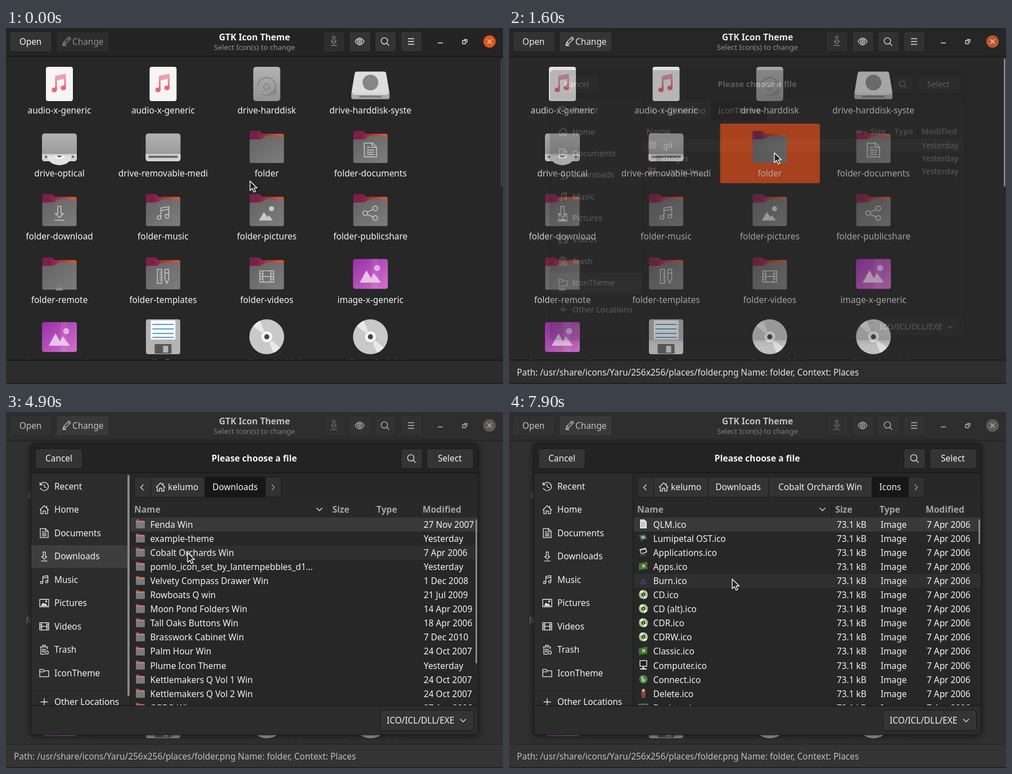
An HTML page for the animation above (8000 ms loop, 884x633 px).

```html
<!DOCTYPE html>
<html lang="en">
<head>
<meta charset="utf-8">
<title>GTK Icon Theme</title>
<style>
html,body{margin:0;width:100%;height:100%;overflow:hidden;background:#272727}
svg{display:block;width:100vw;height:100vh}
text{font:15.4px "Noto Sans","Open Sans",sans-serif;fill:#f4f4f4;white-space:pre}
.b{font-weight:700;font-size:15.7px}
.h{font-weight:700;font-size:15.6px;fill:#a4a4a4}
.s{font-size:13px;fill:#969696}
.m{text-anchor:middle}
.ln{fill:none;stroke:#e8e8e8;stroke-width:1.3;stroke-linejoin:round}
.em{fill:none;stroke:#c9c9c9;stroke-width:1.2;stroke-linejoin:round}
</style>
</head>
<body>
<svg id="stage" viewBox="0 0 884 633" preserveAspectRatio="none"></svg>
<script>
const LOOP = 8000, STEP = 100;

const rect = (x, y, w, h, fill, more = '') => `<rect x="${x}" y="${y}" width="${w}" height="${h}" fill="${fill}" ${more}/>`;
const path = (d, more = '') => `<path d="${d}" ${more}/>`;
const disc = (x, y, r, fill, more = '') => `<circle cx="${x}" cy="${y}" r="${r}" fill="${fill}" ${more}/>`;
const text = (x, y, s, cls = '', more = '') => `<text x="${x}" y="${y + 5.5}" class="${cls}" ${more}>${s}</text>`;
const at = (x, y, body, more = '') => `<g transform="translate(${x} ${y})" ${more}>${body}</g>`;
const grad = (id, a, b, dir = 'x2="0" y2="1"') => `<linearGradient id="${id}" ${dir}><stop stop-color="${a}"/><stop offset="1" stop-color="${b}"/></linearGradient>`;
const button = (x, y, w, h, more = '') => rect(x + .5, y + .5, w, h, '#343434', `rx="4" stroke="#191919" ${more}`);
const ring = (x, y, r) => `M${x + r} ${y}a${r} ${r} 0 1 1${-2 * r} 0a${r} ${r} 0 1 1${2 * r} 0z`;

// Line symbols, centred on the origin
const sym = {
  recent: 'M-6.6-3.5A7.4 7.4 0 1 1-7 2.5M-7.5-7.5v4.5h4.5M0-4v4.5l4 2',
  home: 'M-8 .5L0-7.5L8 .5M-6-1v8h4v-5h4v5h4v-8M4.5-7v3',
  doc: 'M-7-8h9.5l4.500 4.500v11.500h-14zM2-8v5h5M-4-3h4M-4 0h8M-4 2.500h8M-4 5h8',
  down: 'M-1.800-8h3.600v8.500h3l-4.800 4.500-4.800-4.500h3zM-5.500 8h11',
  music: 'M-2.500 5v-11l9-1.500v11M-2.500-3l9-1.500' + ring(-4.6, 5, 2.1) + ring(4.4, 3.5, 2.1),
  pic: 'M-8-6.500h16v13h-16z' + ring(3.5, -3, 1.2),
  video: 'M-8-6.500h16v13h-16zM-4.500-6.500v13M4.500-6.500v13M-4.500 0h9M-8-3h3.500M-8 0h3.500M-8 3h3.500M4.500-3h3.500M4.500 0h3.500M4.500 3h3.500',
  trash: 'M-7.500-5h14M-3-5v-3h5v3M-6-5v13h7M-3-2v7M-.5-2v7M2-2v3M5.500-5v4' + ring(4.5, 5, 2.8),
  folder: 'M-8 6.500v-13h6l2 2.500h8v10.500zM-8-2h7l2-2',
  plus: 'M-6.500 0h13M0-6.500v13',
  search: ring(-1, -1, 5.7) + 'M3.200 3.200L7.500 7.500',
  menu: 'M-5.500-5h11M-5.500 0h11M-5.500 5h11',
  eye: 'M-8 0q8-12 16 0q-8 12-16 0z' + ring(0, 0, 3.7) + ring(0, 0, 1.2),
  share: ring(-6, 0, 2.7) + ring(5.5, -5.5, 2.7) + ring(5.5, 5.5, 2.7) + 'M-3.600-1.200L3-4.300M-3.600 1.200L3 4.300',
  tools: 'M-6.500-8h5v16h-5zM-4-5h2.500M-4-2h2.500M-4 1h2.500M-4 4h2.500M2-8h4.500v11l-2.200 5-2.300-5zM2-4h4.500'
};
const hill = 'M-6 5l4-6 2.500 3 1.500-1.500 4 4.500z';
const icon = (x, y, name, more = '') => at(x, y, path(sym[name]) + (name == 'pic' ? path(hill, 'fill="#e8e8e8" stroke="none"') : ''), `class="ln" ${more}`);

// Large icons, centred on the origin
const folder = emblem => {
  let s = path('M-30.500 0V-26q0-3 3-3h12q3 0 4.500 2l2 3h36.500q3 0 3 3v10z', 'fill="url(#tab)"') +
    path('M-30.500-11q0-3 3-3h15q3 0 5-2l4-2.500q2-1.500 5-1.500h26q3 0 3 3v42q0 3-3 3h-55q-3 0-3-3z', 'fill="url(#front)"');
  if (emblem == 'pic') s += at(0, 6, path('M-14 12l9-15 6 9 3-3 7 9z') + disc(8.5, -9, 4.5, '#c9c9c9'), 'fill="#c9c9c9"');
  else if (emblem == 'net') s += path('M-30 27.500h61M0 24v4', 'stroke="#777" stroke-width="2"') + rect(-6, 25, 12, 5, '#8c8c8c');
  else if (emblem) s += `<g transform="translate(0 5) scale(1.55)" class="em" style="stroke-width:.95">${path(sym[emblem])}</g>`;
  return s;
};
const audio = rect(-24, -30.5, 48, 61, '#f6f4f4', 'rx="4"') +
  at(0, 0, path('M-6 10V-13l16-3.500V6', 'fill="none" stroke="url(#note)" stroke-width="3"') +
    path('M-6-13l16-3.500v7l-16 3.500z', 'fill="#eba0ac"') +
    `<ellipse cx="-9" cy="10.500" rx="4.800" ry="4.200" fill="#e8667c"/><ellipse cx="7" cy="7" rx="4.800" ry="4.200" fill="#e8667c"/>`);
const hard = rect(-24, -30.5, 48, 61, 'url(#metal)', 'rx="5"') +
  path('M-16 4a16 16 0 1 1 7 14M16 4v14h-13a16 16 0 0 0 13-14', 'fill="none" stroke="#858585" stroke-width="2"') + ring2();
function ring2() { return `<circle cy="5" r="5.500" fill="none" stroke="#858585" stroke-width="2"/>`; }
const system = path('M-24-22h48q3 0 4 3l6 36H-34l6-36q1-3 4-3z', 'fill="#dedede"') +
  path('M-34 17h68v7q0 3-3 3h-62q-3 0-3-3z', 'fill="#a9a9a9"') + path('M-31 18h62', 'stroke="#f2f2f2" stroke-width="2"') +
  rect(-20, 21, 40, 3, '#777', 'rx="1"') + disc(0, -2.5, 14, '#868686');
const removable = rect(-31, -24.5, 62, 49.5, 'url(#metal)', 'rx="5"') +
  path('M-31 12h62v8q0 5-5 5h-52q-5 0-5-5z', 'fill="#d2d2d2"') + rect(-26, 15, 52, 4, '#6c6c6c', 'rx="1"');
const optical = removable + path('M-22 15h44a22 17 0 0 1-44 0z', 'fill="#e2e2e2"') +
  path('M-8 15h16a8 6 0 0 1-16 0z', 'fill="#fff"') + path('M-4 15h8a4 3 0 0 1-8 0z', 'fill="#666"');
const picture = rect(-31, -26, 62, 53, 'url(#mauve)', 'rx="4"') + rect(2, -26, 12, 53, '#fff', 'opacity=".08"') +
  path('M-19 16l12-22 8 14 5-9 13 17z', 'fill="#eac2ea"') + disc(12, -10, 5.5, '#e5ade6');
const floppy = rect(-30.5, -31, 61, 62, '#b4b4b4', 'rx="4"') + rect(-22, -29, 44, 34, '#fafafa', 'rx="2"') +
  path('M-19-22h38M-19-14h38M-19-6h38M-19 1h38', 'stroke="#4a90c4" stroke-width="1.600"') +
  rect(-15, 13, 30, 17, '#575757', 'rx="2"') + rect(0, 16, 9, 12, '#b4b4b4');
const cd = disc(0, 0, 31, '#c9c9c9') + path('M0 0L-24-19A31 31 0 0 1-12-28.500zM0 0L24 19A31 31 0 0 1 12 28.500z', 'fill="#e9e9e9"') +
  disc(0, 0, 11, '#f2f2f2', 'stroke="#b0b0b0"') + disc(0, 0, 4.5, '#444');

const grid = [
  ['audio-x-generic', audio], ['audio-x-generic', audio], ['drive-harddisk', hard], ['drive-harddisk-syste', system],
  ['drive-optical', optical], ['drive-removable-medi', removable], ['folder', folder()], ['folder-documents', folder('doc')],
  ['folder-download', folder('down')], ['folder-music', folder('music')], ['folder-pictures', folder('pic')], ['folder-publicshare', folder('share')],
  ['folder-remote', folder('net')], ['folder-templates', folder('tools')], ['folder-videos', folder('video')], ['image-x-generic', picture],
  ['image-x-generic', picture], ['media-floppy', floppy], ['media-optical-bd', cd], ['media-optical-dvd', cd]
];
const cells = grid.map(([, art], i) => at(95 + i % 4 * 184.4, 99.5 + (i >> 2) * 112.4, art)).join('');
const labels = grid.map(([name], i) => text(95 + i % 4 * 184.4, 146 + (i >> 2) * 112.4, name, 'm')).join('');

const mainWindow = rect(0, 0, 884, 633, '#272727') +
  rect(375.5, 170, 177.5, 106, '#e04a17', 'rx="3" id="pick"') + cells + `<g id="labels">${labels}</g>` +
  rect(880, 54, 3, 228, '#8a8a8a', 'rx="1.500" id="mainBar"') +
  rect(0, 0, 884, 50, '#242424') + rect(0, 49.5, 884, 2, '#171717') +
  `<g id="tools">${button(6, 6, 75, 36)}${button(564, 6, 38, 36, 'opacity=".65"')}${[610, 655.5, 701.5].map(x => button(x, 6, 38, 36)).join('')}</g>` +
  text(43.5, 24, 'Open', 'm') +
  `<g id="change">${button(89, 6, 94, 36)}${text(118, 24, 'Change')}${at(108, 23, path('M-7 7l2-5L4-7l3 3-9 9zM2-5l3 3M-5 2l3 3') + path('M-7 8h6', 'stroke-width="2"'), 'class="ln"')}</g>` +
  text(442, 16, 'GTK Icon Theme', 'b m') + text(442, 33, 'Select Icon(s) to change', 's m') +
  icon(583, 23, 'down', 'opacity=".45"') + icon(629, 24, 'eye') + icon(674, 24, 'search') + icon(720.5, 24, 'menu') +
  path('M768 26.500h9M814.500 20.500h5.500v5.500M812 22.500h5.500v5.500h-5.500z', 'class="ln"') +
  disc(860, 24, 11, '#e4541c') + disc(860, 24, 11, '#636363', 'id="shut"') +
  path('M856 20l8 8M864 20l-8 8', 'class="ln" stroke-width="1.600"') +
  rect(0, 590, 884, 43, '#2c2c2c') + rect(0, 589.5, 884, 2, '#181818') + rect(0, 631.5, 884, 1.5, '#301028') +
  text(14, 612, 'Path: /usr/share/icons/Yaru/256x256/places/folder.png Name: folder, Context: Places', '', 'id="status"');

// File chooser
const HOME = 'kelumo', PACK = 'Cobalt Orchards Win';
const chevron = (x, y) => path(`M${x - 5} ${y - 2.5}l5 5 5-5`, 'class="ln"');
const places = ['recent Recent', 'home Home', 'doc Documents', 'down Downloads', 'music Music', 'pic Pictures', 'video Videos', 'trash Trash', 'folder IconTheme'];
const sidebar = rect(45, 108, 175, 414, '#2c2c2c') + rect(45, 445, 175, 40, '#3e3e3e', 'id="place"') +
  places.map((p, i) => {
    const [name, label] = p.split(' '), y = 132.5 + i * 41.45;
    return icon(68, y, name) + text(86, y, label);
  }).join('') +
  rect(45, 494, 175, 1, '#262626') + icon(68, 515.5, 'plus') + text(86, 515.5, 'Other Locations') +
  rect(216, 112, 4, 393, '#878787', 'rx="2" id="sideBar"') + rect(220, 108, 1.5, 414, '#1c1c1c');

const crumbs = list => {
  let x = 257, s = '';
  list.forEach(([name, w], i) => {
    const on = i == list.length - 1;
    s += rect(x + .5, 115.5, w, 36, on ? '#171717' : '#333', 'stroke="#1a1a1a"') +
      (i ? text(x + w / 2 + .5, 133.5, name, 'm') : icon(275, 133.5, 'home') + text(288, 133.5, name));
    x += w;
  });
  return rect(228.5, 115.5, x - 200, 36, '#313131', 'rx="4" stroke="#1a1a1a"') + s +
    path('M244.500 129l-5 5 5 5', 'class="ln"') + path(`M${x + 11.5} 129l5 5-5 5`, 'class="ln" opacity=".6"');
};
const heads = cols => rect(222, 160, 617, 27, '#292929') + text(228, 173, 'Name', 'h') + chevron(cols[0] - 23, 173) +
  cols.map((x, i) => rect(x - 7, 161, 1, 25, '#202020') + text(x, 173, ['Size', 'Type', 'Modified'][i], 'h')).join('');
const rowY = i => 200 + i * 25.1;
const dirIcon = path('M-8-6q0-2 2-2h3l1 2h8q2 0 2 2v3h-16z', 'fill="#d34a3e"') + rect(-8, -4.5, 16, 12.5, '#7a7a7a', 'rx="1.500"') + path('M-7-4h14', 'stroke="#ccc" stroke-width=".7"');
const rows = (list, dateX) => list.map(([name, date], i) =>
  at(239, rowY(i) - 1, dirIcon) + text(256.5, rowY(i), name) + text(dateX, rowY(i), date)).join('');

const small = {
  d: path('M-6-8h8l4 4V8H-6z', 'fill="#dde0d6"') + path('M-4-2h7M-4 1h7M-4 4h7', 'stroke="#999"'),
  k: path('M-7-5l11-3 3 8-11 4z', 'fill="#d5d8d2"') + path('M-5-3l8-2 2 4-8 3z', 'fill="#222"') + rect(-6, 3, 11, 4, '#3b433d'),
  s: path('M-8-5l11-2 4 9-11 4z', 'fill="#3e5a43"') + path('M-5-3l7-1 2 4-6 2z', 'fill="#9db69c"') + rect(-1, 3, 8, 4, '#20271f'),
  g: path('M-8-5l15-3v13l-15 2z', 'fill="#47712f"') + path('M-2-3l5 5M3-3l-5 5', 'stroke="#cfe3b6" stroke-width="1.600"'),
  b: rect(-6, 3, 12, 4, '#2c4668') + path('M-3 3q0-10 3-10t3 10z', 'fill="#272c44"') + disc(0, 0, 2, '#a33a2c'),
  c: disc(0, 0, 8, '#a9c58a') + path('M0 0L-7-4A8 8 0 0 1-1-8zM0 0L7 4A8 8 0 0 1 1 8z', 'fill="#e3efcf"') + disc(0, 0, 3.2, '#24361c') + disc(0, 0, 1.2, '#dfe8d4'),
  m: rect(-6, -8, 12, 10, '#222', 'stroke="#d8d8d0" stroke-width="1.500"') + rect(-2, 3, 4, 3, '#bbb') + rect(-6, 6, 12, 2, '#ddd'),
  o: disc(0, 0, 7.5, '#4d8040') + path('M-5-4q4-3 5 1t4 4q-2 5-5 4t-2-4-2-5z', 'fill="#9cc58c"'),
  r: disc(0, -5, 3, '#caa08a') + rect(-4, -2, 8, 6, '#a63c34') + rect(-3, 4, 6, 4, '#4b5a70'),
  t: rect(-8, -6, 16, 12, '#3d5a4b', 'stroke="#78907f"')
};
const files = [['QLM', 'd'], ['Lumipetal OST', 's'], ['Applications', 'k'], ['Apps', 'g'], ['Burn', 'b'], ['CD', 'c'], ['CD (alt)', 'c'],
  ['CDR', 'c'], ['CDRW', 'c'], ['Classic', 'g'], ['Computer', 'm'], ['Connect', 'o'], ['Delete', 'r'], ['Desktop', 't']];
const fileRows = files.map(([name, kind], i) => {
  const y = rowY(i);
  return at(239, y - 1, small[kind]) + text(256.5, y, name + '.ico') + text(583, y, '73.1 kB') + text(661, y, 'Image') + text(743, y, '7 Apr 2006');
}).join('');

const recent = 'Yesterday', autumn = '24 Oct 2007';
const downloads = [['Fenda Win', '27 Nov 2007'], ['example-theme', recent], [PACK, '7 Apr 2006'],
  ['pomlo_icon_set_by_lanternpebbles_d1…', recent], ['Velvety Compass Drawer Win', '1 Dec 2008'], ['Rowboats Q win', '21 Jul 2009'],
  ['Moon Pond Folders Win', '14 Apr 2009'], ['Tall Oaks Buttons Win', '18 Apr 2006'], ['Brasswork Cabinet Win', '7 Dec 2010'],
  ['Palm Hour Win', autumn], ['Plume Icon Theme', recent], ['Kettlemakers Q Vol 1 Win', autumn], ['Kettlemakers Q Vol 2 Win', autumn], ['ORBO Win', '27 Apr 2006']];
const narrow = [580.5, 659, 741], root = [HOME, 96], dl = ['Downloads', 108];
const views = [
  crumbs([root, ['IconTheme', 107]]) + heads([659, 705, 756.5]) + rows([['.git', recent], ['images', recent], ['__pycache__', recent]], 758),
  crumbs([root, dl]) + heads(narrow) + rows(downloads, 743),
  crumbs([root, dl, [PACK, 184]]) + heads(narrow) + rows([['Icons', '7 Apr 2006']], 743),
  crumbs([root, dl, [PACK, 184], ['Icons', 65]]) + heads(narrow) + fileRows
];

const dialog = rect(44, 56, 796, 518, '#272727', 'rx="6" stroke="#181818" style="filter:drop-shadow(0 2px 6px #0008)"') +
  rect(221, 187.5, 618, 25, '#393939') + rect(221, 0, 618, 25, '#2f2f2f', 'id="hover"') + sidebar +
  views.map((v, i) => `<g id="view${i}">${v}</g>`).join('') +
  rect(835, 191, 3, 44, '#878787', 'rx="1.500" id="listBar"') +
  path('M45 108V62q0-5 5-5h784q5 0 5 5v46z', 'fill="#232323"') + rect(45, 107.5, 794, 1.5, '#191919') +
  button(52, 65, 83, 35) + text(94, 82.5, 'Cancel', 'm') + text(441.5, 82.5, 'Please choose a file', 'b m') +
  button(702, 65, 38, 35) + icon(721, 82.5, 'search') + button(748, 65, 83, 35) + text(789.5, 82.5, 'Select', 'm') +
  path('M45 522h794v46q0 5-5 5h-784q-5 0-5-5z', 'fill="#2c2c2c"') + rect(45, 521.5, 794, 1.5, '#1b1b1b') +
  button(665, 530, 166, 36) + text(677, 548.5, 'ICO/ICL/DLL/EXE') + chevron(813, 548.5);

const stage = document.getElementById('stage');
stage.innerHTML = `<defs>${grad('tab', '#7a1f4c', '#e2541f', 'x1=".2" x2=".9"')}${grad('front', '#636363', '#7d7d7d', 'x2="1" y2="1"')}` +
  `${grad('metal', '#b2b2b2', '#939393')}${grad('mauve', '#9b2fa8', '#cf72cb', 'x2="1" y2="1"')}${grad('note', '#eba0ac', '#e6607a')}</defs>` +
  mainWindow + rect(0, 0, 884, 631.5, '#484848', 'id="veil"') + `<g id="dialog">${dialog}</g>` +
  path('M0 0V17l4-3.600 2.900 6.400 3-1.300-2.900-6.200h5.400z', 'id="cursor" fill="#222" stroke="#fff" stroke-width="1.300" stroke-linejoin="round"');

const el = {};
stage.querySelectorAll('[id]').forEach(n => el[n.id] = n);
const set = (id, name, v) => el[id].setAttribute(name, v);
const alpha = (id, v) => set(id, 'opacity', v);
const show = (id, on) => set(id, 'display', on ? 'inline' : 'none');
const ramp = (t, a, b) => Math.min(1, Math.max(0, (t - a) / (b - a)));

// Pointer stops: time, x, y
const stops = [[100, 434, 272], [700, 472, 222], [2100, 472, 222], [2300, 507, 301], [2400, 507, 301], [2500, 461, 310],
  [3200, 461, 310], [3300, 128, 275], [3400, 128, 275], [3500, 156, 265], [4000, 156, 265], [4200, 247, 266], [4300, 247, 266],
  [4500, 335, 243], [4600, 335, 243], [4700, 323, 250], [5600, 323, 250], [6000, 281, 205], [7100, 281, 205], [7900, 397, 297]];
const pointer = t => {
  let i = 0;
  while (i < stops.length - 2 && t > stops[i + 1][0]) i++;
  const a = stops[i], b = stops[i + 1], k = ramp(t, a[0], b[0]);
  return [a[1] + (b[1] - a[1]) * k, a[2] + (b[2] - a[2]) * k];
};

function draw(ms) {
  const t = Math.floor(ms / STEP) * STEP;
  const [x, y] = pointer(t), open = ramp(t, 1500, 1900), pick = ramp(t, 900, 1300);
  set('cursor', 'transform', `translate(${x} ${y})`);
  alpha('pick', pick);
  alpha('change', .5 + .5 * pick);
  show('status', t >= 1000);
  alpha('mainBar', t < 3300 ? .25 + .75 * ramp(t, 100, 700) : 0);

  alpha('veil', .3 * open);
  alpha('shut', open);
  alpha('labels', 1 - .55 * open);
  set('tools', 'fill-opacity', 1 - .6 * open);
  show('dialog', open > 0);
  alpha('dialog', open);
  const z = .9 + .1 * open;
  set('dialog', 'transform', `translate(${442 * (1 - z)} ${315 * (1 - z)}) scale(${z})`);

  const view = [3500, 5300, 6500].filter(v => t >= v).length;
  for (let i = 0; i < 4; i++) show('view' + i, i == view);
  show('place', view < 2);
  set('place', 'y', view ? 237 : 445);
  show('sideBar', t >= 3300 && t < 5300);
  show('listBar', view == 1 || view == 3);
  set('listBar', 'height', view == 1 ? 256 : 44);
  alpha('listBar', view == 1 ? ramp(t, 4300, 4700) : ramp(t, 7100, 7500));

  const row = Math.floor((y - 187.5) / 25.1);
  show('hover', row > 0 && (view == 1 && t >= 4900 || view == 3));
  set('hover', 'y', rowY(Math.max(row, 0)) - 12.5);
}

function tick(now) {
  draw(now % LOOP);
  requestAnimationFrame(tick);
}
draw(0);
requestAnimationFrame(tick);
</script>
</body>
</html>
```
